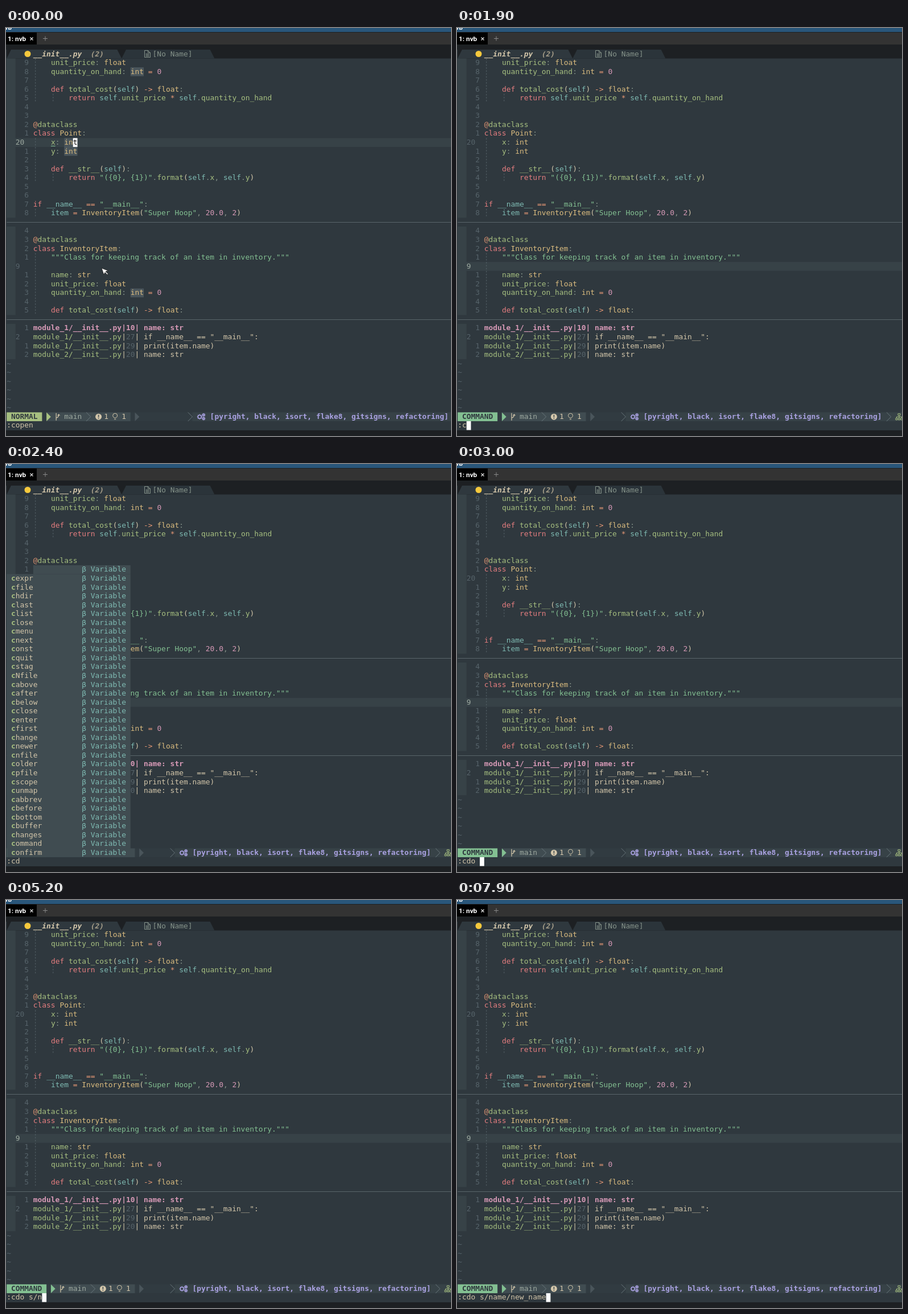
Animation, 782 px wide and 717 px high, one loop 8000 ms. Source, as an HTML page with a canvas:

```html
<!DOCTYPE html>
<html lang="en">
<head>
<meta charset="utf-8">
<title>Editor session</title>
<style>
html, body { margin: 0; width: 100%; height: 100%; overflow: hidden; background: #2f383e; }
canvas { display: block; }
</style>
</head>
<body>
<canvas id="stage" width="782" height="717"></canvas>
<script>
const c = document.getElementById('stage').getContext('2d');
const LEFT = 1.2, TOP = 38, CW = 7.77, LH = 15.547, LOOP = 8000;
const MONO = '12.906px "DejaVu Sans Mono", monospace';
const bg = '#2f383e', bg1 = '#374247', bg2 = '#404c51', bg3 = '#4a555b', dark = '#1d2023',
  dim = '#56636a', grey = '#859289', fg = '#d3c6aa', red = '#e67e80', orange = '#e69875',
  yellow = '#dbbc7f', green = '#a7c080', aqua = '#83c092', blue = '#7fbbb3',
  pink = '#d699b6', violet = '#a9a1e1', white = '#ffffff';

// Rows of the two code windows: row, line number, code
const code = [
  [1, '9', '    unit_price: float'],
  [2, '8', '    quantity_on_hand: int = 0'],
  [3, '7', ''],
  [4, '6', '    def total_cost(self) -> float:'],
  [5, '5', '        return self.unit_price * self.quantity_on_hand'],
  [6, '4', ''],
  [7, '3', ''],
  [8, '2', '@dataclass'],
  [9, '1', 'class Point:'],
  [10, '20', '    x: int'],
  [11, '1', '    y: int'],
  [12, '2', ''],
  [13, '3', '    def __str__(self):'],
  [14, '4', '        return "({0}, {1})".format(self.x, self.y)'],
  [15, '5', ''],
  [16, '6', ''],
  [17, '7', 'if __name__ == "__main__":'],
  [18, '8', '    item = InventoryItem("Super Hoop", 20.0, 2)'],
  [20, '4', ''],
  [21, '3', '@dataclass'],
  [22, '2', 'class InventoryItem:'],
  [23, '1', '    """Class for keeping track of an item in inventory."""'],
  [24, '9', ''],
  [25, '1', '    name: str'],
  [26, '2', '    unit_price: float'],
  [27, '3', '    quantity_on_hand: int = 0'],
  [28, '4', ''],
  [29, '5', '    def total_cost(self) -> float:']
];
const quickfix = [
  ['module_1/__init__.py', '10', 'name: str'],
  ['module_1/__init__.py', '27', 'if __name__ == "__main__":'],
  ['module_1/__init__.py', '29', 'print(item.name)'],
  ['module_2/__init__.py', '20', 'name: str']
];
const words = ('copen cc cd cdo call cfdo cmap copy cNext catch cexpr cfile chdir clast clist close ' +
  'cmenu cnext const cquit cstag cNfile cabove cafter cbelow cclose center cfirst change cnewer ' +
  'cnfile colder cpfile cscope cunmap cabbrev cbefore cbottom cbuffer changes command confirm').split(' ');

// Time at which each number of typed characters is reached
const command = ':cdo s/name/new_name';
const keys = [[1200, 1], [1900, 2], [2400, 3], [3000, 5], [4100, 6], [4300, 7], [5200, 8], [5400, 9],
  [5500, 10], [5700, 11], [5800, 12], [6200, 13], [6300, 14], [6500, 15], [7300, 16],
  [7600, 17], [7700, 18], [7800, 19], [7900, 20]];

const X = col => LEFT + col * CW;
const Y = row => TOP + row * LH;

function box(x, y, w, h, color) {
  c.fillStyle = color;
  c.fillRect(x, y, w, h);
}
function cells(col, row, n, color, rows = 1) {
  box(X(col), Y(row), n * CW, rows * LH, color);
}
function text(s, col, row, color, style = '') {
  c.font = style + ' ' + MONO;
  c.fillStyle = color;
  c.fillText(s, X(col), Y(row) + 11.5);
}
function label(s, x, y) {
  c.font = 'bold 11.8px Roboto, sans-serif';
  c.fillStyle = white;
  c.fillText(s, x, y);
}
function poly(points, color) {
  c.beginPath();
  points.forEach(p => c.lineTo(...p));
  c.fillStyle = color;
  c.fill();
}
function stroke(path, color, width = 1) {
  c.strokeStyle = color;
  c.lineWidth = width;
  c.stroke(new Path2D(path));
}
function disc(x, y, r, color) {
  c.beginPath();
  c.arc(x, y, r, 0, 7);
  c.fillStyle = color;
  c.fill();
}
function cursor(col, row) {
  cells(col, row, 1, white);
}

function tokenColor(s) {
  if (s[0] === '"') return aqua;
  if (/^(def|class|return|if)$/.test(s)) return red;
  if (/^(Point|InventoryItem|float|int|str)$/.test(s)) return yellow;
  if (/^(self|item|__name__)$/.test(s)) return blue;
  if (/^\d/.test(s)) return pink;
  if (/^(->|==|=|\*|@)$/.test(s)) return orange;
  if (/^[:.,]$/.test(s)) return grey;
  return /^\w/.test(s) ? green : fg;
}
function codeLine(s, row) {
  for (const m of s.matchAll(/"""[^"]*"""|"[^"]*"|\d+\.\d|\w+|->|==|\S/g))
    text(m[0], 6 + m.index, row, tokenColor(m[0]));
}
function guide(col, row, n) {
  c.setLineDash([2.6, 2.6]);
  stroke(`M${X(col) + 3.9} ${Y(row)}v${n * LH}`, dim);
  c.setLineDash([]);
}

function topBars() {
  box(0, 0, 782, 38, dark);
  box(0, 0, 782, 7, '#29567a');
  label('nvb', -9, 3);
  box(0, 8, 782, 21, '#333333');
  box(0, 8, 54, 21, '#000');
  label('1: nvb', 3, 22.5);
  stroke('M42.5 16.5l5 5m0-5l-5 5', '#ddd', 1.3);
  stroke('M65 18.5h8m-4-4v8', '#888');
}
function tab(from, to, color) {
  poly([[X(from), Y(1)], [X(from + 1), TOP], [X(to), TOP], [X(to + 1), Y(1)]], color);
}
function tabline() {
  cells(0, 0, 101, dark);
  tab(0, 25, bg);
  tab(26, 46, '#2b343a');
  disc(38, 45.5, 5.5, '#f5c93d');
  text('__init__.py', 6, 0, fg, 'italic bold');
  text('(2)', 19, 0, '#a59d88', 'italic bold');
  stroke('M243.5 39.5h6l4 4v8h-10zM249.5 39.5v4h4M245.5 45.5h6M245.5 47.5h6M245.5 49.5h6', grey);
  text('[No Name]', 33, 0, grey);
}

function editor(t) {
  const upper = t < 400, current = upper ? 10 : 24;
  cells(0, 1, 2, bg1, 18);
  cells(0, 20, 2, bg1, 10);
  cells(0, 31, 2, bg1, 4);
  cells(0, current, 101, bg1);
  if (upper)
    [[28, 2], [13, 10], [13, 11], [28, 27]].forEach(([col, row]) => cells(col, row, 3, bg3));
  [[6, 1, 5], [10, 5, 1], [6, 10, 5], [10, 14, 1], [6, 18, 1], [6, 23, 7]].forEach(g => guide(...g));
  for (const [row, num, line] of code) {
    const own = row === 10 || row === 24;
    text(num, own ? 2 : 4, row, row === current ? '#9da9a0' : dim);
    codeLine(line, row);
  }
  if (upper) {
    box(X(10), Y(10) + 13.5, CW, 1, aqua);
    cursor(15, 10);
    text('t', 15, 10, '#000');
  } else if (t < 1200) cursor(6, 24);

  for (const row of [19, 30]) box(LEFT, Math.round(Y(row) + 7.5), 782, 1, '#59656a');
  quickfix.forEach(([file, num, line], i) => {
    const row = 31 + i, first = i === 0, style = first ? 'bold' : '';
    text('1212'[i], i === 1 ? 2 : 4, row, dim);
    text(file, 6, row, first ? pink : green, style);
    text('|', 26, row, first ? pink : fg, style);
    text(num, 27, row, first ? pink : dim, style);
    text('| ' + line, 29, row, first ? pink : fg, style);
  });
  for (let row = 35; row < 41; row++) text('~', 0, row, dim);
}

function arrow(col, color) {
  poly([[X(col), Y(41)], [X(col + 1), Y(41) + LH / 2], [X(col), Y(42)]], color);
}
function chevron(col) {
  stroke(`M${X(col)} ${Y(41)}l${CW} ${LH / 2}l${-CW} ${LH / 2}`, '#68757a');
}
function gear(x, y, r) {
  stroke(`M${x - r} ${y}a${r} ${r} 0 1 0 ${2 * r} 0a${r} ${r} 0 1 0 ${-2 * r} 0`, violet, 1.6);
  for (let i = 0; i < 8; i++) {
    const a = i * Math.PI / 4;
    disc(x + (r + 1) * Math.cos(a), y + (r + 1) * Math.sin(a), .7, violet);
  }
}
function statusline(t) {
  const typing = t >= 1200, mode = typing ? 'COMMAND' : 'NORMAL';
  const tint = typing ? aqua : green, d = typing ? 1 : 0;
  const mid = t < 400 ? 41 : typing ? 37 : 36;
  const y = Y(41) + LH / 2;
  cells(0, 41, 101, '#313b41');
  cells(0, 41, mode.length + 2, tint);
  text(mode, 1, 41, bg, 'bold');
  cells(9 + d, 41, 19, bg2);
  arrow(9 + d, tint);

  const bx = X(11 + d);
  stroke(`M${bx + 1.5} ${y - 6.5}v13M${bx + 1.5} ${y + 2}q4.5 -1 4.5 -6m-2 2l2 -2l2 2`, fg, 1.2);
  text('main', 13 + d, 41, '#9da9a0');
  chevron(18 + d);
  disc(X(20 + d) + 6, y, 5.5, fg);
  box(X(20 + d) + 5.2, y - 3.5, 1.6, 4.2, bg2);
  box(X(20 + d) + 5.2, y + 1.7, 1.6, 1.6, bg2);
  text('1', 22 + d, 41, fg);
  const lx = X(24 + d) + 4;
  stroke(`M${lx - 1.5} ${y + 2}q-2.5 -2 -2.5 -4a4 4 0 0 1 8 0q0 2 -2.5 4zM${lx - 1.5} ${y + 4.5}h3`, fg);
  text('1', 26 + d, 41, fg);
  arrow(29 + d, bg3);

  box(X(mid + 1), Y(41), 782, LH, bg1);
  chevron(mid);
  gear(X(mid + 2) + 5, y, 3);
  gear(X(mid + 2) + 12, y - 3.2, 1.5);
  gear(X(mid + 2) + 12, y + 3.2, 1.5);
  text('[pyright, black, isort, flake8, gitsigns, refactoring]', mid + 5, 41, violet, 'bold');
  chevron(mid + 60);
  if (t >= 400) {
    const x = X(99);
    stroke(`M${x + 4.5} ${y - 5.5}h4v3h-4zM${x + .5} ${y + 2.5}h3v3h-3zM${x + 5} ${y + 2.5}h3v3h-3z` +
      `M${x + 9.5} ${y + 2.5}h3v3h-3zM${x + 6.5} ${y - 2}v4M${x + 2} ${y + 2}v-2h9v2`, green);
  }
}

// Completion menu; while it closes, its upper rows are already gone
function menu(closing) {
  if (closing) {
    cells(6, 9, 22, bg2);
    cells(0, 10, 28, bg2, 32);
  } else {
    cells(0, 0, 28, bg2, 42);
    cells(0, 0, 28, green);
    cells(28, 0, 1, bg3, 42);
    cells(28, 0, 1, '#7f8b80', 21);
  }
  words.forEach((word, row) => {
    if (closing && row < 9) return;
    const picked = row === 0;
    if (!closing || row > 9) {
      text('c', 1, row, picked ? bg : green, 'bold');
      text(word.slice(1), 2, row, picked ? bg : fg);
    }
    text('β Variable', 17, row, picked ? bg : blue);
  });
}

function commandLine(t) {
  const typed = keys.reduce((n, [at, count]) => t >= at ? count : n, 0);
  text(typed ? command.slice(0, typed) : ':copen', 0, 42, fg);
  if (typed && typed !== 3) cursor(typed, 42);
}

function pointer() {
  poly([[168, 422], [179.5, 426.5], [175, 428], [179.5, 432], [178, 433.5], [174, 429.5], [172, 433.5]], white);
  stroke('M168 422l11.5 4.5l-4.5 1.5l4.5 4l-1.5 1.5l-4 -4l-2 4z', '#111', .7);
}

function draw(t) {
  box(0, 0, 782, 717, bg);
  topBars();
  tabline();
  editor(t);
  statusline(t);
  if (t >= 2000 && t < 3000) menu(t >= 2400);
  commandLine(t);
  box(0, 707, 782, 10, dark);
  if (t < 200) pointer();
}

const start = performance.now();
function tick() {
  draw((performance.now() - start) % LOOP);
  requestAnimationFrame(tick);
}
tick();
</script>
</body>
</html>
```
